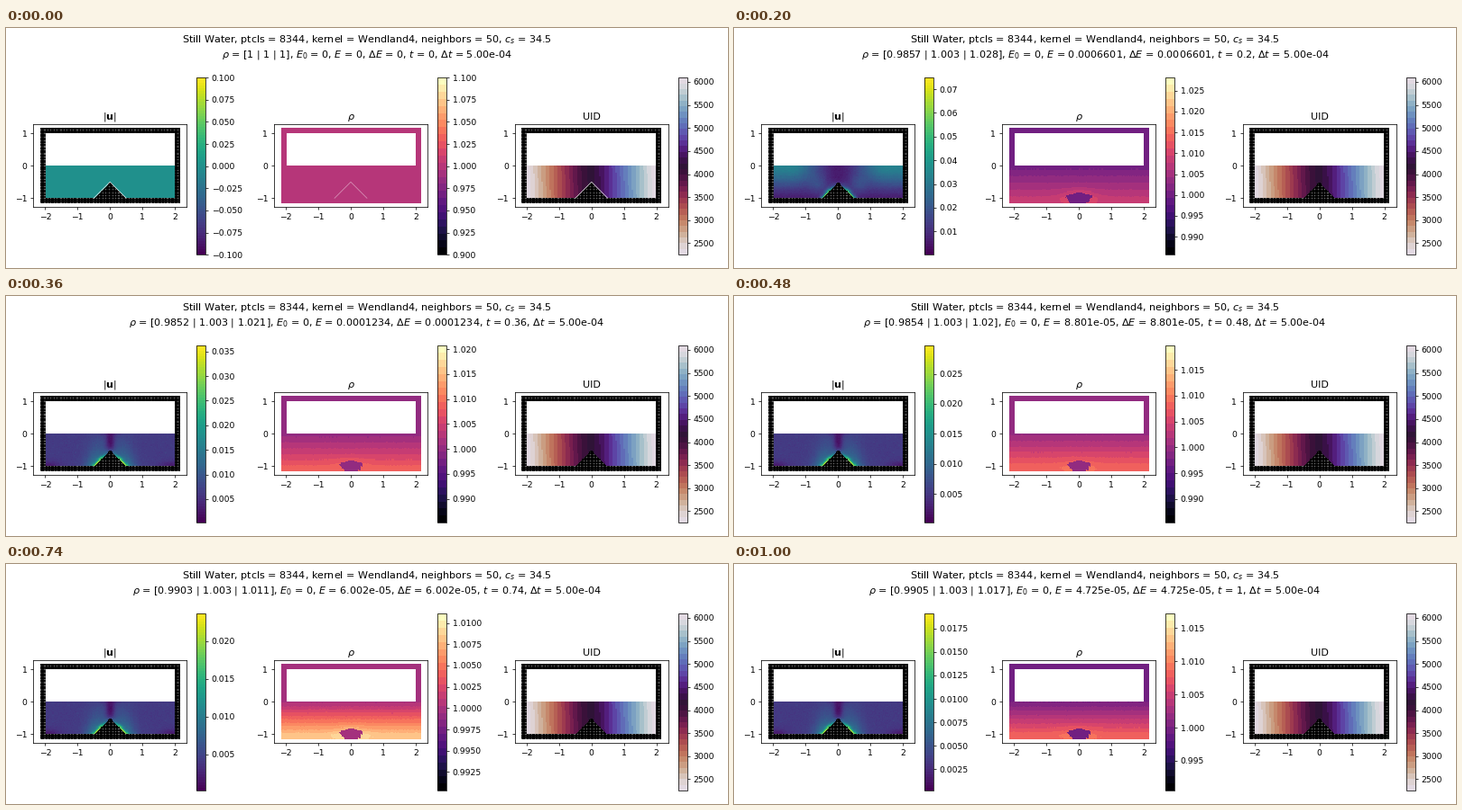
Write a matplotlib script that moves like this. It is 800 px wide and 267 px high and loops after 1.02 s.

```python
import numpy as np
import matplotlib.pyplot as plt
from matplotlib.animation import FuncAnimation

W, H, DPI = 800, 267, 64
FRAMES, STEP = 51, 0.02
PITCH = 266.8  # distance between panels in pixels
K = 200 / 3 / DPI  # point sizes are designed for 66.7 dpi

plt.rcParams.update({
    "font.family": "DejaVu Sans", "font.size": 10 * K,
    "axes.linewidth": 0.8 * K, "axes.titlepad": 6 * K,
    **{f"{a}tick.major.{p}": v * K for a in "xy"
       for p, v in (("size", 3.5), ("width", 0.8), ("pad", 3.5))},
})

# particle lattice
DX = 1 / 32
NX, NY = 138, 74
x = (np.arange(NX) - NX / 2 + 0.5) * DX
y = (np.arange(NY) - NY / 2 + 0.5) * DX
X, Y = np.meshgrid(x, y)
AX = np.abs(X)
inside = (AX < 2) & (np.abs(Y) < 1)
wedge = inside & (Y < -0.5 - AX)
fluid = inside & (Y < 0) & ~wedge
solid = ~inside | wedge
EXTENT = (-NX * DX / 2, NX * DX / 2, -NY * DX / 2, NY * DX / 2)

rng = np.random.default_rng(4)
grain = rng.normal(size=(NY, NX))

# key values over time
T = [.02, .06, .10, .14, .20, .36, .48, .74, .90, 1.0]
SPEED = [.19, .27, .20, .12, .0749, .0362, .0297, .0236, .0207, .0191]
ENERGY = [.03, .02, .008, .0025, .0006601, .0001234, 8.801e-5, 6.002e-5,
          5.112e-5, 4.725e-5]
RHO_MIN = [.995, .991, .988, .986, .9857, .9852, .9854, .9903, .9904, .9905]
RHO_MAX = [1.012, 1.020, 1.024, 1.026, 1.0281, 1.0207, 1.0197, 1.0111,
           1.0108, 1.0172]


def at(t, values):
    return np.exp(np.interp(t, T, np.log(values)))


def bump(cx, cy, sx, sy):
    return np.exp(-((AX - cx) / sx) ** 2 - ((Y - cy) / sy) ** 2)


def smooth(a, b, v):
    s = np.clip((v - a) / (b - a), 0, 1)
    return s * s * (3 - 2 * s)


flank = np.maximum(Y + 0.5 + AX, 0) / np.sqrt(2)
along = np.exp(-((AX - 0.38) / 0.22) ** 2)

early = (0.08 + 0.36 * smooth(-1.1, 0, Y) * smooth(0, 1.5, AX)
         + 0.1 * bump(0.6, -0.6, 0.3, 0.3)
         + 0.7 * np.exp(-flank / 0.05) * along)
late = (0.18 + 0.3 * np.exp(-flank / 0.28 - ((AX - 0.52) / 0.36) ** 2)
        + 0.42 * np.exp(-(flank / 0.06) ** 2) * along
        - 0.15 * bump(0, -0.25, 0.13, 0.27) - 0.06 * bump(0, 0, 0.35, 0.1)
        - 0.1 * bump(1.95, -1, 0.4, 0.15))


def speed_field(t):
    w = 1 - smooth(0.2, 0.36, t)
    shape = w * early + (1 - w) * late + 0.006 * grain
    return np.clip(shape, 0.01, 1) * at(t, SPEED)


def density_field(t):
    """Hydrostatic column with an untouched core under the wedge."""
    settle = 1 - np.cos(2 * np.pi * t / 0.116) * np.exp(-t / 0.06)
    w = 1 - smooth(0.2, 0.36, t)
    rho = 1 + 0.0081 * settle * np.clip(-Y, 0, 1.03)
    rho += 0.00006 * grain * (Y < 0)
    halo = np.exp(-(AX / 0.5) ** 2 - ((Y + 1) / 0.25) ** 2)
    rho += (0.0012 + 0.003 * w) * halo
    side = 0.37 + 0.05 * w - np.maximum(-0.97 - Y, 0) + 0.02 * grain
    rho[(Y < -0.8 - 0.3 * AX) & (AX < side)] = 1
    rho[Y > 0] = 1
    return rho, 1 + 0.003 * settle


uid = np.zeros((NY, NX))
uid.T[fluid.T] = 2252 + np.arange(fluid.sum())

# packed black beads with faint gaps
gap_x = (np.arange(NX) * 5 % 16 < 5)[None, :]
gap_y = (np.arange(NY) * 5 % 16 < 5)[:, None]
beads = np.zeros((NY, NX, 4))
beads[..., 3] = solid * np.where(gap_x & gap_y, 0.6,
                                 np.where(gap_x | gap_y, 0.92, 1))

fig = plt.figure(figsize=(W / DPI, H / DPI), dpi=DPI, facecolor="white")


def box(left, top, w, h):
    return fig.add_axes([left / W, 1 - (top + h) / H, w / W, h / H])


def panel(i, title, cmap, data, mask, limits, walls=True):
    ax = box(30 + PITCH * i, 107.3, 170.4, 92)
    opts = dict(origin="lower", extent=EXTENT, aspect="auto",
                interpolation="nearest")
    im = ax.imshow(np.ma.array(data, mask=~mask), cmap=cmap,
                   vmin=limits[0], vmax=limits[1], **opts)
    if walls:
        ax.imshow(beads, **opts)
    seam, = ax.plot([-0.5, 0, 0.5], [-1, -0.5, -1], color="white",
                    lw=0.8, alpha=0.9 if walls else 0.5)
    ax.set(xlim=(-2.372, 2.372), ylim=(-1.277, 1.277),
           xticks=range(-2, 3), yticks=(-1, 0, 1))
    ax.set_title(title)
    fig.colorbar(im, cax=box(211.3 + PITCH * i, 55.2, 10, 197))
    return im, seam


rest, unit = np.zeros((NY, NX)), np.ones((NY, NX))
u_im, u_seam = panel(0, r"$|\mathbf{u}|$", plt.get_cmap("viridis", 65),
                     rest, fluid, (-0.1, 0.1))
r_im, r_seam = panel(1, r"$\rho$", plt.get_cmap("magma", 25),
                     unit, fluid | solid, (0.9, 1.1), walls=False)
id_im, id_seam = panel(2, "UID", plt.get_cmap("twilight_r", 31),
                       uid, fluid, (2252, 6091))


def heading(baseline, text=""):
    return fig.text(0.5, 1 - baseline / H, text, ha="center", va="baseline",
                    fontsize=12 * K)


heading(15.9, "Still Water, ptcls = 8344, kernel = Wendland4, "
              "neighbors = 50, $c_s$ = 34.5")
status = heading(32.5)


def put(im, data, mask, lo, hi):
    im.set_data(np.ma.array(data, mask=~mask))
    im.set_clim(lo, hi)


def update(i):
    t = i * STEP
    if i == 0:
        lo = mean = hi = 1
        energy = 0
        put(u_im, rest, fluid, -0.1, 0.1)
        put(r_im, unit, fluid | solid, 0.9, 1.1)
    else:
        rho, mean = density_field(t)
        lo, hi = at(t, RHO_MIN), at(t, RHO_MAX)
        energy = at(t, ENERGY)
        put(u_im, speed_field(t), fluid, 0.0002, at(t, SPEED))
        put(r_im, rho, fluid | solid, lo, hi)
    for seam in (u_seam, r_seam, id_seam):
        seam.set_visible(i < 2)
    status.set_text(
        rf"$\rho$ = [{lo:.4g} | {mean:.4g} | {hi:.4g}], $E_0$ = 0, "
        rf"$E$ = {energy:.4g}, $\Delta E$ = {energy:.4g}, "
        rf"$t$ = {t:.4g}, $\Delta t$ = 5.00e-04")
    return u_im, r_im, status


anim = FuncAnimation(fig, update, frames=FRAMES, interval=20, repeat=True,
                     repeat_delay=0, blit=False)
plt.show()
```
